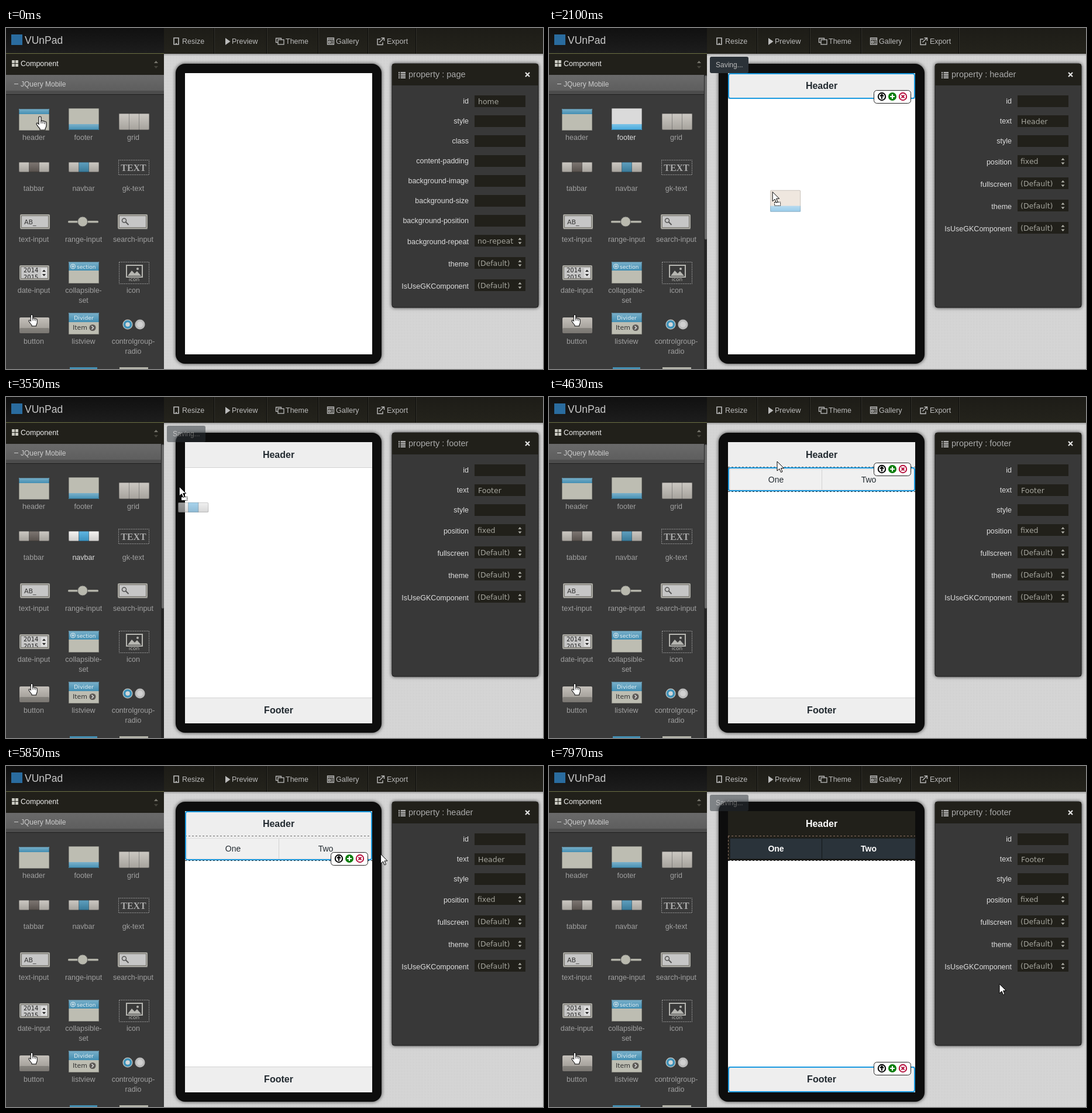
Recreate the animation shown at these times as an HTML page. Size 918 by 582 pixels, loop 8 s.

```html
<!DOCTYPE html>
<html lang="en">
<head>
<meta charset="utf-8">
<title>App builder</title>
<style>
html, body { margin: 0; width: 918px; height: 582px; overflow: hidden; background: #d4d4d4; }
svg { display: block; font-family: "Liberation Sans", Arial, sans-serif; font-size: 12.5px; }
.dv { font-family: "DejaVu Sans", Verdana, sans-serif; }
.icon { --body: #bdbdb2; --blue: #438fb3; --cell: #c3bfb8; --label: #a0a0a0; }
.icon.hot { --body: #dadada; --blue: #45aade; --cell: #f4f2f0; --label: #ddd; }
.icon.ghost { --body: #e8dbcf; --blue: #62b1df; --cell: #e6e6e6; }
.body { fill: var(--body); }
.blue { fill: var(--blue); }
.cell { fill: var(--cell); }
.label { fill: var(--label); text-anchor: middle; }
.mid { text-anchor: middle; }
.end { text-anchor: end; }
</style>
</head>
<body>
<svg id="stage" width="918" height="582" viewBox="0 0 918 582"></svg>
<script>
const LOOP = 8000;
const OLIVE = '#21201a', SELECT = '#1b9ae0';
const stage = document.getElementById('stage');

const rect = (x, y, w, h, fill, more = '') =>
  `<rect x="${x}" y="${y}" width="${w}" height="${h}" fill="${fill}" ${more}/>`;
const frame = (x, y, w, h, stroke, more = '') => rect(x, y, w, h, 'none', `stroke="${stroke}" ${more}`);
const text = (x, y, s, fill, more = '') => `<text x="${x}" y="${y}" fill="${fill}" ${more}>${s}</text>`;
const path = (d, fill, more = '') => `<path d="${d}" fill="${fill}" ${more}/>`;
const line = (d, stroke, w = 1, more = '') => path(d, 'none', `stroke="${stroke}" stroke-width="${w}" ${more}`);
const circle = (x, y, r, fill, more = '') => `<circle cx="${x}" cy="${y}" r="${r}" fill="${fill}" ${more}/>`;
const move = (x, y, s) => `<g transform="translate(${x} ${y})">${s}</g>`;
const gradient = (id, ...stops) => `<linearGradient id="${id}" x2="0" y2="1">${stops.map(([o, c, a = 1]) =>
  `<stop offset="${o}" stop-color="${c}" stop-opacity="${a}"/>`).join('')}</linearGradient>`;
const spinner = (x, y, fill) => path(`M${x - 3} ${y - 2}h6l-3 -3.5zM${x - 3} ${y + 2}h6l-3 3.5z`, fill);

const HAND = path('M-2 1q0-2 2-2t2 2v6q2-2 3 0 2-1 3 1 3-1 3 2v4q0 3-2 6v2h-9v-2q-3-3-6-8 0-3 3-1l1 1z',
  '#fff', 'stroke="#111" stroke-width="1.2"') + line('M2 7v4M5 8v3M8 9v3', '#111');
const ARROW = path('M0 0V16L4 12.5 6.5 18.5 9 17.5 6.5 11.5H11.5Z', '#fff', 'stroke="#000"');
const BADGE = rect(3.5, 17.5, 10, 6, '#fff', 'stroke="#000" stroke-dasharray="2 1"');

// Component icons, drawn from their own top left corner
const blueBar = (y, h) => rect(0, y, 52, h, '', 'class="blue" style="fill:var(--blue)"') + rect(0, y, 52, h, 'url(#gloss)');
const tile = (w, h) => `<rect width="${w}" height="${h}" rx="1.5" class="body"/>`;
const edge = (w, h) => frame(.5, .5, w - 1, h - 1, '#000', 'stroke-opacity=".25" rx="1.5"');
const field = s => rect(1, 1, 50, 25, '#555') + rect(1, 1, 49, 23, '#c6c6c6', 'stroke="#aaa9a2" stroke-width="2" rx="1"') +
  frame(2.5, 2.5, 46, 20, '#77756f') + s;
const threeCells = (mid, h) => `<rect width="52" height="${h}" rx="2" class="cell"/>` + mid +
  rect(0, 0, 52, h, 'url(#shade)') + line(`M17.5 0v${h}M34.5 0v${h}`, '#555', 1, 'opacity=".5"') + edge(52, h);
const dotted = (w, h) => frame(.5, .5, w, h, '#aaa', 'stroke-dasharray="1.5 1.5"');

const icons = {
  header: () => tile(52, 37) + blueBar(0, 9) + edge(52, 37),
  footer: () => tile(52, 37) + blueBar(27, 10) + edge(52, 37),
  grid: () => threeCells('', 28),
  tabbar: () => threeCells(rect(17, 0, 18, 17, '#675f5a'), 17),
  navbar: () => threeCells('<rect x="17" width="18" height="17" class="blue"/>', 17),
  'gk-text': () => dotted(52, 25) + text(26, 19, 'TEXT', '#aaa',
    'class="mid" font-family="Liberation Serif, serif" font-weight="bold" font-size="16"'),
  'text-input': () => field(text(7, 17, 'AB_', '#333', 'class="dv" font-size="11"')),
  'range-input': () => rect(0, 11, 52, 3.5, '#b2b2a8', 'rx="1.5"') + circle(25, 12.5, 8.5, '#b9b9ae', 'stroke="#555"'),
  'search-input': () => field(circle(11, 10.5, 3.5, 'none', 'stroke="#555" stroke-width="1.5"') + line('M13.5 13l5 5', '#555', 2)),
  'date-input': () => field('<svg x="3" y="4" width="46" height="18">' +
    text(4, 8, '2014', '#222', 'class="dv" font-size="10"') + text(4, 20, '2015', '#222', 'class="dv" font-size="10"') +
    '</svg>' + rect(37, 5, 10, 16, '#ddd') + spinner(42, 13, '#222')),
  'collapsible-set': () => tile(52, 37) + blueBar(0, 15) + circle(7.5, 8, 4, 'none', 'stroke="#e5eef2"') +
    line('M5 8h5M7.5 5.5v5', '#e5eef2') + text(14, 11.5, 'section', '#e5eef2', 'class="dv" font-size="9"') + edge(52, 37),
  icon: () => dotted(51, 37) + frame(13, 6, 27, 20, '#b5b5b0', 'stroke-width="2"') +
    path('M15 24l7-9 5 5 4-4 7 8z', '#b5b5b0') + circle(32, 12, 2, '#b5b5b0') +
    text(26, 33, 'icon', '#b5b5b0', 'class="dv mid" font-size="9"'),
  button: () => rect(0, 0, 51, 27, 'url(#button)', 'rx="2"') + rect(0, 18, 51, 9, '#000', 'opacity=".2" rx="2"') +
    move(21, -4, `<g transform="scale(.85)">${HAND}</g>`),
  listview: () => tile(52, 37) + blueBar(0, 16) + text(26, 12, 'Divider', '#e5eef2', 'class="dv mid" font-size="9.5"') +
    text(7, 29, 'Item', '#333', 'class="dv" font-size="11"') + circle(41, 25.5, 5.5, '#5c5855') +
    line('M39.5 22.5l3 3-3 3', '#ddd', 1.5) + edge(52, 37),
  'controlgroup-radio': () => circle(9, 9, 8.5, '#c9c9c4') + circle(9, 9, 5.5, '#d2d8da', 'stroke="#3d91b8" stroke-width="3.5"') +
    circle(30, 9, 8.5, '#bbb') + circle(30, 9, 5, '#d0d0d0')
};
const places = {
  header: [22, 138], footer: [107, 137], grid: [193, 146],
  tabbar: [22, 229], navbar: [107, 229], 'gk-text': [192, 225],
  'text-input': [24, 318], 'range-input': [106, 318], 'search-input': [191, 318],
  'date-input': [23, 405], 'collapsible-set': [107, 399], icon: [193, 399],
  button: [23, 494], listview: [107, 486], 'controlgroup-radio': [199, 497]
};

function component(name, i) {
  const cx = [47.5, 132.5, 217.5][i % 3], y = 191 + 87 * Math.floor(i / 3);
  const parts = name.length > 14 ? name.split(/(?<=-)/) : [name];
  return `<g class="icon" id="${name}">${move(...places[name], icons[name]())}` +
    parts.map((s, k) => `<text x="${cx}" y="${y + 17 * k}" class="label">${s}</text>`).join('') + '</g>';
}

function toolbar() {
  const c = '#bbb';
  const marks = line('M287 17h8v11h-8zM290 26.5h2', c, 1.6) + path('M375 17v12l8.5-6z', c) +
    line('M461.5 17.5h9v7h-9z', c, 1.3) + rect(465, 20, 10, 8, OLIVE, `stroke="${c}" stroke-width="1.3"`) +
    line('M549.5 17h11v11h-11zM549 19.5h12M551.5 22.5h3v3h-3zM556 22.5h3M556 25.5h3', c, 1.3) +
    line('M640 19h-5v9.5h9v-4M638.5 24.5l7-7M641.5 17h5v5', c, 1.4);
  const names = [['Resize', 301], ['Preview', 386], ['Theme', 478], ['Gallery', 564], ['Export', 651]];
  return rect(0, 0, 918, 44, 'url(#bar)') + marks + names.map(([s, x]) => text(x, 27, s, c)).join('') +
    [355, 445, 533, 618, 700].map(x => rect(x, 0, 1, 44, '#0c0c0a') + rect(x + 1, 0, 1, 44, '#34332d')).join('');
}

function sidebar() {
  return rect(0, 0, 270, 582, '#3a3a3a') + rect(0, 0, 270, 43, 'url(#brand)') +
    rect(9, 11, 19, 18, '#2a6c9f') + text(32, 27, 'VUnPad', '#c8c8c8', 'font-size="17.5"') +
    rect(0, 43, 270, 1, '#6c7044') + rect(0, 44, 270, 36, OLIVE) +
    [[10, 55], [16, 55], [10, 61], [16, 61]].map(([x, y]) => rect(x, y, 5, 5, '#c8c8c0')).join('') +
    text(25, 65, 'Component', '#eee') + path('M253 60h7l-3.5-4z', '#77756c') + path('M253 65h7l-3.5 4z', '#45443c') +
    rect(0, 80, 270, 27, 'url(#group)') + rect(0, 107, 270, 6, '#4c4c4c') + rect(0, 113, 270, 1, '#202020') +
    rect(14, 95, 7, 1, '#ccc') + text(25, 100, 'JQuery Mobile', '#ccc', 'font-size="12"') +
    Object.keys(icons).map(component).join('') +
    rect(109, 579, 47, 3, '#438fb3') + rect(194, 579, 49, 3, '#b5b5ab') +
    `<g id="scroll">${rect(265, 80, 5, 502, '#262626')}${rect(266, 81, 4, 280, '#6a6a6a', 'rx="2"')}</g>`;
}

// Property panel: a value of null is an empty input, a leading ">" marks a select
const GK = ['IsUseGKComponent', '>(Default)'], THEME = ['theme', '>(Default)'];
const bar = name => [['id'], ['text', name], ['style'], ['position', '>fixed'], ['fullscreen', '>(Default)'], THEME, GK];
const forms = {
  page: [['id', 'home'], ['style'], ['class'], ['content-padding'], ['background-image'], ['background-size'],
    ['background-position'], ['background-repeat', '>no-repeat'], THEME, GK],
  header: bar('Header'),
  footer: bar('Footer'),
  navbar: [['id'], ['style'], ['iconPos', '>(Default)'], ['transition', '>(Default)'], THEME, GK]
};
function properties(kind, theme) {
  let y = 125, out = text(688, 84, 'property : ' + kind, '#aaa', 'font-size="14.5"');
  for (const [label, raw = ''] of forms[kind]) {
    const select = raw[0] === '>';
    const value = label === 'theme' ? theme : raw.replace('>', '');
    out += text(791, y + (select ? 6 : 4), label, '#ddd', 'class="end"') + rect(801, y - 10, 87, 20, OLIVE) +
      text(select ? 806 : 807, y + 5, value, '#a6a69e', 'class="dv" clip-path="url(#values)"');
    if (select) out += spinner(878.5, y + .5, '#b5b5ad');
    y += select ? 38 : 34;
  }
  return out;
}
const panel = rect(660, 61, 250, 416, '#383838', 'rx="4" stroke="#1c1c1c" filter="url(#shadow)"') +
  path('M660 98V65q0-4 4-4h242q4 0 4 4v33z', OLIVE) +
  line('M671 76h2M671 79h2M671 82h2M671 85h2', '#bbb', 2) + line('M674.5 76h8.5M674.5 79h8.5M674.5 82h8.5M674.5 85h8.5', '#bbb', 2) +
  line('M888 76l7 7M895 76l-7 7', '#e5e5e5', 2.2);

stage.innerHTML = `<defs>
  ${gradient('bar', [0, '#1d1c17'], [1, '#24231c'])}
  ${gradient('brand', [0, '#101010'], [1, '#1d1d1d'])}
  ${gradient('group', [0, '#6a6a6a'], [1, '#5e5e5e'])}
  ${gradient('gloss', [0, '#fff', .3], [1, '#fff', 0])}
  ${gradient('shade', [0, '#fff', .15], [1, '#000', .15])}
  ${gradient('button', [0, '#c4c0ba'], [1, '#98948e'])}
  ${gradient('drop', [0, '#000', .25], [1, '#000', 0])}
  <pattern id="grain" width="5" height="5" patternUnits="userSpaceOnUse">${rect(0, 0, 5, 5, '#d4d4d4')}
    ${rect(1, 0, 1, 2, '#d0d0d0')}${rect(3, 3, 1, 1, '#d8d8d8')}</pattern>
  <filter id="shadow" x="-10%" y="-10%" width="120%" height="120%"><feDropShadow dx="0" dy="0" stdDeviation="3" flood-opacity=".75"/></filter>
  <clipPath id="values">${rect(801, 0, 67, 582, '#000')}</clipPath></defs>` +
  rect(0, 0, 918, 582, 'url(#grain)') + rect(270, 44, 648, 4, 'url(#drop)') + toolbar() + sidebar() +
  rect(290, 61, 352, 512, '#111', 'rx="16" filter="url(#shadow)"') + rect(306, 77, 320, 480, '#fff') +
  panel + '<g id="live"></g>';

const live = document.getElementById('live');
const scroll = document.getElementById('scroll');

// Position along [time, x, y] keys
function along(keys, t) {
  const i = keys.findIndex(k => k[0] > t);
  if (i === 0) return keys[0].slice(1);
  if (i < 0) return keys[keys.length - 1].slice(1);
  const [t0, x0, y0] = keys[i - 1], [t1, x1, y1] = keys[i], p = (t - t0) / (t1 - t0);
  return [x0 + (x1 - x0) * p, y0 + (y1 - y0) * p];
}
// Last value whose start time has passed
const latest = (steps, t) => steps.filter(s => s[0] <= t).pop()[1];

const pointer = [[0, 58, 152], [520, 62, 152], [1000, 374, 148], [1260, 374, 148], [1530, 132, 152], [1620, 132, 152],
  [2100, 382, 279], [2460, 430, 528], [2590, 430, 528], [2890, 330, 420], [3100, 134, 234], [3190, 134, 234],
  [3550, 296, 153], [3730, 335, 140], [4030, 388, 110], [4230, 390, 110], [5070, 390, 110], [5310, 538, 110],
  [5430, 540, 95], [5600, 540, 95], [5850, 640, 150], [6200, 850, 303], [6380, 850, 303], [6540, 838, 356],
  [6650, 829, 350], [7050, 829, 350], [7500, 520, 533], [7790, 520, 533], [7850, 560, 510], [7970, 770, 372]];
const drags = [
  { name: 'header', hover: 60, from: 520, to: 1260, keys: [[520, 22, 138], [1000, 396, 162]] },
  { name: 'footer', hover: 1530, from: 1620, to: 2530, keys: [[1620, 107, 137], [2100, 378, 276], [2460, 430, 518]] },
  { name: 'navbar', hover: 3100, from: 3190, to: 4630,
    keys: [[3190, 107, 229], [3550, 294, 180], [3730, 335, 161], [4030, 410, 128], [4230, 412, 128]] }
];
const forming = [[0, 'page'], [1320, 'header'], [2590, 'footer'], [4690, 'navbar'], [5550, 'header'], [7910, 'footer']];
// Selection: top, bottom, tool box top
const selecting = [[0, null], [1260, [77, 121, 106]], [2530, [513, 557, 505]], [3250, null],
  [4630, [120, 161, 112]], [5550, [77, 161, 147]], [7910, [513, 557, 505]]];
const dropping = [[0, null], [700, 77], [1260, null], [2280, 513], [2530, null], [3850, 77], [4630, null]];
const saves = [1700, 2950, 5070, 7370];

const tools = y => rect(555.5, y + .5, 63, 22, '#fff', 'rx="5" stroke="#222"') + move(0, y + 11,
  circle(569, 0, 6.2, '#fff', 'stroke="#000" stroke-width="2"') + line('M569 4v-7M566 -.5l3-3 3 3', '#000', 2) +
  circle(587, 0, 7, '#0a7d0a') + line('M583 0h8M587 -4v8', '#fff', 2.2) +
  circle(605, 0, 6.2, '#fff', 'stroke="#b5123e" stroke-width="2"') + line('M602.5 -2.5l5 5M607.5 -2.5l-5 5', '#b5123e', 2));

function page(t) {
  const dark = t >= 7110, nav = t >= 4630, ink = dark ? '#fff' : '#222a30';
  const title = (y, s, fill) => text(466, y, s, fill, 'class="mid" font-size="16" font-weight="bold"');
  let out = '';
  if (t >= 1260) {
    const h = nav ? 84 : 44;
    out += rect(306, 77, 320, h, dark ? OLIVE : '#eee') + rect(306, 76 + h, 320, 1, dark ? '#111' : '#d2d2d2') +
      title(104, 'Header', ink);
  }
  if (nav) {
    out += rect(309.5, 123.5, 317, 35, dark ? '#2a333a' : '#f0f0f0', `stroke="${dark ? '#1b1f22' : '#dcdcdc'}"`) +
      rect(466, 124, 1, 35, dark ? '#14171a' : '#d2d2d2') + rect(626, 122, 2, 39, '#111') +
      [['One', 388], ['Two', 546.5]].map(([s, x]) =>
        text(x, 146, s, ink, `class="mid" font-size="14" font-weight="${dark ? 'bold' : 'normal'}"`)).join('') +
      line('M306 119.5h320M306.5 120v41', dark ? '#8d7263' : '#666', 1, 'stroke-dasharray="3 3"') +
      line('M306 161.5h320', '#333', 1, 'stroke-dasharray="3 3"');
  }
  if (t >= 2530) out += rect(306, 513, 320, 44, '#eee') + rect(306, 513, 320, 1, '#d2d2d2') + title(540, 'Footer', '#222a30');
  const zone = latest(dropping, t), picked = latest(selecting, t);
  if (zone) out += frame(306.5, zone + .5, 319, 43, '#7cc3da', 'stroke-dasharray="3 2"');
  if (picked) {
    const [top, bottom, y] = picked;
    out += frame(307, top + 1, 318, bottom - top - 2, SELECT, 'stroke-width="2" rx="3"') + tools(y);
  }
  return out;
}

function dropdown(t, y) {
  let out = t >= 6260 && t < 7850 ? frame(800.5, 292.5, 88, 21, '#3f8fd0', 'rx="1"') : '';
  if (t < 6300 || t >= 7050) return out;
  const on = Math.max(0, Math.min(2, Math.floor((y - 314) / 14)));
  out += rect(801.5, 313.5, 86, 43, OLIVE, 'stroke="#1e90ff"') + rect(802, 314 + 14 * on, 85, 14.5, '#1e90ff');
  return out + ['(Default)', 'a', 'b'].map((s, i) =>
    text(806, 326 + 14 * i, s, i === on ? '#fff' : '#a6a69e', 'class="dv"')).join('');
}

function saving(t) {
  const start = saves.filter(s => s <= t).pop();
  const alpha = start === undefined ? 0 : Math.min(1, 1 - (t - start - 420) / 360);
  return alpha <= 0 ? '' : `<g opacity="${alpha}">${rect(275, 49, 66, 28, '#2b3238', 'rx="3"')}` +
    text(285, 67, 'Saving...', '#bbb', 'font-size="12"') + '</g>';
}

function draw(t) {
  scroll.style.display = t >= 60 && t < 5500 ? '' : 'none';
  let cursor = ARROW, ghost = '';
  for (const d of drags) {
    const hot = t >= d.hover && t < d.to;
    document.getElementById(d.name).classList.toggle('hot', hot);
    if (hot && t < d.from) cursor = HAND;
    if (hot && t >= d.from) {
      cursor = BADGE + ARROW;
      ghost = `<g class="icon ghost" opacity=".65">${move(...along(d.keys, t), icons[d.name]())}</g>`;
    }
  }
  if (t < 60) cursor = HAND;
  const [x, y] = along(pointer, t);
  const theme = t >= 7050 && t < 7910 ? 'b' : '(Default)';
  live.innerHTML = page(t) + properties(latest(forming, t), theme) + dropdown(t, y) + saving(t) + ghost + move(x, y, cursor);
}

const began = performance.now();
function tick() {
  draw((performance.now() - began) % LOOP);
  requestAnimationFrame(tick);
}
tick();
</script>
</body>
</html>
```
